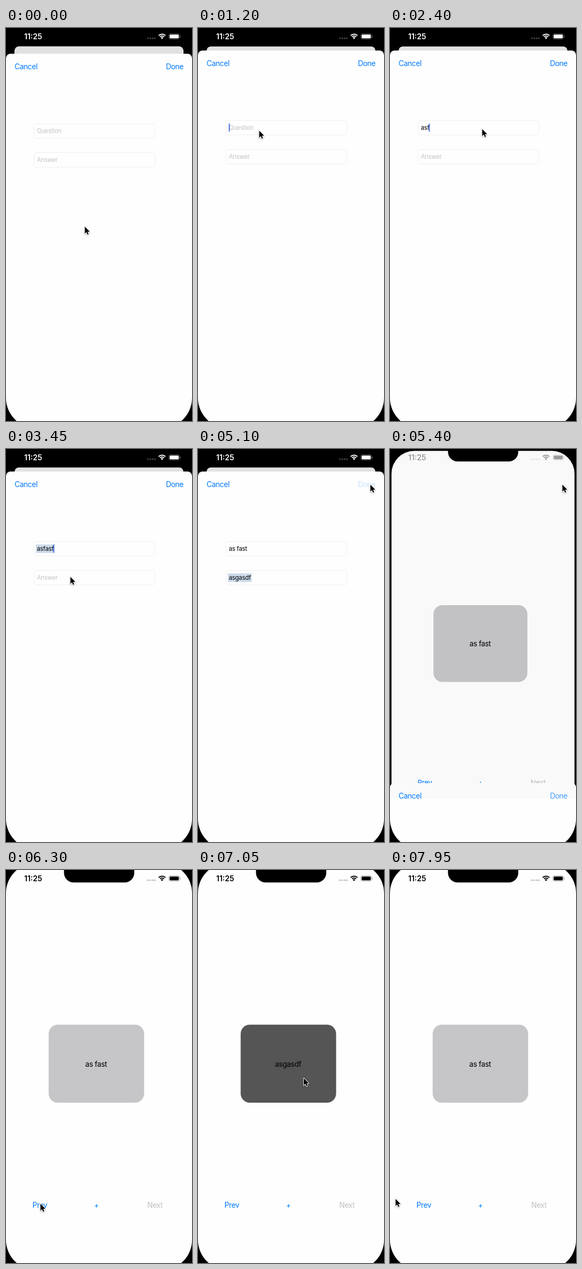
Recreate the animation shown at these times as an HTML page with a canvas. Size 348 by 733 pixels, loop 8 s.

```html
<!DOCTYPE html>
<html lang="en">
<head>
<meta charset="utf-8">
<title>Flashcards</title>
<style>
html, body { margin: 0; width: 100%; height: 100%; overflow: hidden; background: #000; }
canvas { display: block; width: 348px; height: 733px; }
</style>
</head>
<body>
<canvas id="stage"></canvas>
<script>
const W = 348, H = 733, LOOP = 8000, TICK = 150;
const BLUE = '#007aff', PAPER = '#fefefe', FAINT = '#c4c4c6';
const SHEET_TOP = 42, TRAVEL = 701, DISMISS = 5150;
const canvas = document.getElementById('stage');
const ctx = canvas.getContext('2d');
const dpr = window.devicePixelRatio || 1;
canvas.width = W * dpr;
canvas.height = H * dpr;

// Pointer stops: time, x, y
const stops = [
  [150, 147, 370], [750, 114, 191], [1350, 114, 191], [1800, 172, 188],
  [3000, 172, 188], [3450, 120, 238], [4500, 120, 238], [4950, 322, 66],
  [5400, 322, 66], [6150, 71, 625], [6300, 64, 622], [6450, 64, 622],
  [6900, 197.5, 388], [7500, 197.5, 388], [7950, 10, 613]
];

const clamp = v => Math.max(0, Math.min(1, v));
const lerp = (a, b, k) => a + (b - a) * k;
const ease = k => k * k * (3 - 2 * k);
const within = (t, a, b) => t >= a && t < b;

function pointerAt(t) {
  let i = 0;
  while (i < stops.length - 2 && t >= stops[i + 1][0]) i++;
  const [t0, x0, y0] = stops[i], [t1, x1, y1] = stops[i + 1];
  const k = ease(clamp((t - t0) / (t1 - t0)));
  return [lerp(x0, x1, k), lerp(y0, y1, k)];
}

// How far the sheet is down: it settles first, later springs away
function sheetDrop(t) {
  if (t < DISMISS) return 6 / TRAVEL * Math.exp(-t / 120);
  const x = (t - DISMISS) * 0.0128;
  return 1 - (1 + x) * Math.exp(-x);
}

function box(x, y, w, h, r) {
  ctx.beginPath();
  ctx.roundRect(x, y, w, h, r);
}

function fillBox(x, y, w, h, r, color) {
  box(x, y, w, h, r);
  ctx.fillStyle = color;
  ctx.fill();
}

function setFont(size, weight = 400) {
  ctx.font = `${weight} ${size}px Inter, "Liberation Sans", sans-serif`;
  ctx.letterSpacing = weight > 400 ? '0px' : size < 12 ? '-0.2px' : '-0.4px';
}

// Text placed by the middle of its capitals
function label(str, x, mid, size, color, align = 'left', weight = 400) {
  setFont(size, weight);
  ctx.textAlign = align;
  ctx.textBaseline = 'alphabetic';
  ctx.fillStyle = color;
  ctx.fillText(str, x, mid + size * 0.36 + 0.4);
}

function drawHome(t, p) {
  const rest = 1 - p;
  const inset = 16 * rest, top = -10 + 44.5 * Math.pow(rest, 0.68);
  ctx.save();
  box(inset, top, W - 2 * inset, 743 - top, lerp(8, 46, Math.min(1, p * 1.1)));
  ctx.clip();
  ctx.fillStyle = PAPER;
  ctx.fillRect(0, -10, W, 760);

  const s = 1 - 0.092 * rest;
  ctx.save();
  ctx.translate(W / 2, 366.5 + 9 * rest);
  ctx.scale(s, s);
  ctx.translate(-W / 2, -366.5);
  const back = within(t, 7050, 7500);
  fillBox(79.8, 288.4, 178.6, 145.6, 17, back ? '#555555' : '#c6c6c9');
  label(back ? 'asgasdf' : 'as fast', 168.6, 361.3, 13.8, '#000', 'center');
  label('Prev', 49.5, 624.3, 13.8, BLUE);
  label('+', 169, 624.3, 13.8, BLUE, 'center');
  label('Next', 293, 624.3, 13.8, '#bfbfc1', 'right');
  ctx.restore();

  ctx.fillStyle = `rgba(0,0,0,${0.115 * rest})`;
  ctx.fillRect(0, -10, W, 760);
  ctx.restore();
}

function drawField(y, f) {
  box(52.5, y + 0.5, 226, 27, 4.5);
  ctx.strokeStyle = '#efefef';
  ctx.lineWidth = 1;
  ctx.stroke();
  setFont(11.3);
  const w = f.text ? ctx.measureText(f.text).width : 0;
  if (f.marked) fillBox(56, y + 6, w + 3.2, 16, 0, '#cddbeb');
  label(f.text || f.hint, 57.7, y + 14, 11.3, f.text ? '#000' : FAINT);
  if (f.caret) fillBox(57.6 + w - (w ? 0.8 : 0), y + 6, 1.8, 15.5, 1, '#3f67e4');
}

function questionField(t) {
  const typed = Math.floor((t - 2100) / TICK) + 1;
  return {
    hint: 'Question',
    text: t < 2100 ? '' : t < 3600 ? 'asfasf'.slice(0, typed) : 'as fast',
    marked: within(t, 3150, 3600),
    caret: within(t, 1200, 1650) || within(t, 2100, 3000) || within(t, 3150, 3600)
  };
}

function answerField(t) {
  const typed = Math.floor((t - 4200) / TICK) * 2 + 1;
  return {
    hint: 'Answer',
    text: t < 4200 ? '' : 'asgasdf'.slice(0, typed),
    marked: t >= 4800,
    caret: within(t, 3600, 3900) || within(t, 4200, 4950)
  };
}

function drawSheet(t, p) {
  const top = SHEET_TOP + TRAVEL * p;
  if (top > H) return;
  const corners = [8.4, 8.4, 0, 0];
  ctx.save();
  ctx.translate(0, top);
  fillBox(0, 0, W, 760, corners, PAPER);
  if (t > DISMISS) fillBox(0, 0, W, 29, corners, '#fafafa');
  label('Cancel', 16, 23.3, 13.8, BLUE);
  ctx.globalAlpha = t < 5100 ? 1 : Math.min(1, 0.22 + (t - 5100) / 600);
  label('Done', 332, 23.3, 13.8, BLUE, 'right');
  ctx.globalAlpha = 1;
  drawField(130, questionField(t));
  drawField(184, answerField(t));
  ctx.restore();
}

function drawStatus(t) {
  const v = Math.round(255 * (1 - clamp((t - 5250) / 375)));
  const ink = `rgb(${v},${v},${v})`;
  label('11:25', 34, 16, 14, ink, 'left', 600);

  ctx.fillStyle = ctx.strokeStyle = ink;
  ctx.globalAlpha = 0.28;
  for (let i = 0; i < 4; i++) {
    ctx.beginPath();
    ctx.arc(265.6 + i * 4.3, 19, 1.6, 0, 7);
    ctx.fill();
  }
  ctx.globalAlpha = 1;

  const a0 = -Math.PI * 0.75, a1 = -Math.PI * 0.25;
  ctx.lineWidth = 2;
  for (const r of [9, 5.6]) {
    ctx.beginPath();
    ctx.arc(292, 20.5, r, a0, a1);
    ctx.stroke();
  }
  ctx.beginPath();
  ctx.moveTo(292, 20.8);
  ctx.arc(292, 20.5, 3.2, a0, a1);
  ctx.fill();

  ctx.globalAlpha = 0.38;
  ctx.lineWidth = 1;
  box(304.7, 10.8, 20, 9.8, 3);
  ctx.stroke();
  fillBox(325.8, 14, 1.2, 3.4, [0, 1, 1, 0], ink);
  ctx.globalAlpha = 1;
  fillBox(306.2, 12.3, 17, 6.9, 1.6, ink);
}

function drawPointer(x, y) {
  ctx.save();
  ctx.translate(x + 0.5, y + 0.4);
  ctx.scale(0.88, 0.88);
  ctx.beginPath();
  ctx.moveTo(0, 0);
  [[0, 15], [3.4, 11.8], [5.6, 17], [8, 16], [5.8, 10.9], [10.4, 10.7]].forEach(q => ctx.lineTo(...q));
  ctx.closePath();
  ctx.lineJoin = 'round';
  ctx.lineWidth = 2;
  ctx.strokeStyle = '#fff';
  ctx.shadowColor = 'rgba(0,0,0,0.35)';
  ctx.shadowBlur = 2.5 * dpr;
  ctx.shadowOffsetY = dpr;
  ctx.stroke();
  ctx.shadowColor = 'transparent';
  ctx.fillStyle = '#000';
  ctx.fill();
  ctx.restore();
}

function draw(t) {
  const p = sheetDrop(t);
  ctx.setTransform(dpr, 0, 0, dpr, 0, 0);
  ctx.fillStyle = '#000';
  ctx.fillRect(0, 0, W, H);
  ctx.save();
  box(0, -13, W, 759, 56);
  ctx.clip();
  drawHome(t, p);
  fillBox(108.5, -10, 131.5, 33.3, [0, 0, 18, 18], '#000');
  drawStatus(t);
  drawSheet(t, p);
  ctx.restore();
  drawPointer(...pointerAt(t));
}

const start = performance.now();
function frame() {
  const t = (performance.now() - start) % LOOP;
  draw(Math.floor(t / TICK) * TICK);
  requestAnimationFrame(frame);
}
frame();
</script>
</body>
</html>
```
